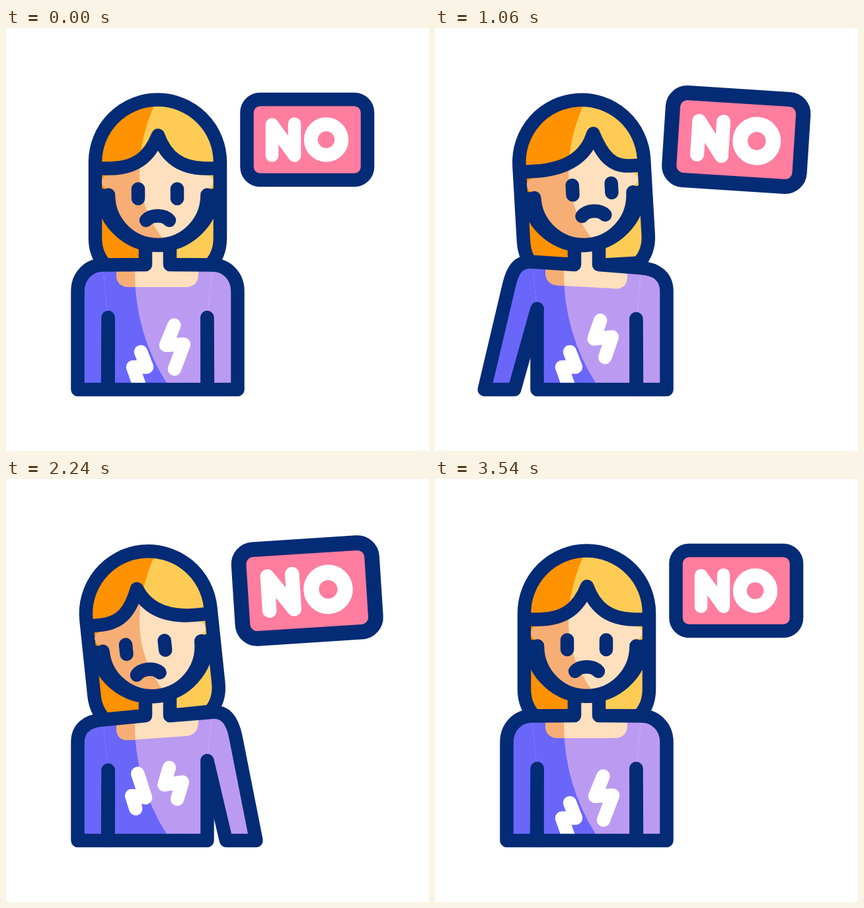
An HTML page with a canvas for the animation above (3600 ms loop, 640 px wide and 640 px high).

```html
<!DOCTYPE html>
<html lang="en">
<head>
<meta charset="utf-8">
<title>No</title>
<style>
html, body { margin: 0; width: 100%; height: 100%; overflow: hidden; background: #fff; }
canvas { display: block; width: 640px; height: 640px; }
</style>
</head>
<body>
<canvas id="stage" width="640" height="640" role="img" aria-label="Sad woman beside a sign that says NO"></canvas>
<script>
const ctx = document.getElementById('stage').getContext('2d');
const LOOP = 3600, PULSE = 812, MID = 229.5;
const NAVY = '#042b75', PINK = '#ff7d9f', WHITE = '#fff';
const HAIR = ['#fecc55', '#ff9200'];
const SKIN = ['#fee0be', '#f7ae75'];
const SHIRT = ['#bb9bf2', '#6a66fa'];

// Eased 0..1 between two times
function ramp(t, from, to) {
  const u = Math.min(1, Math.max(0, (t - from) / (to - from)));
  return u * u * (3 - 2 * u);
}

// Rest -> first lean -> second lean -> rebound -> rest
function pose(t, first, second, rebound = 0) {
  return first * ramp(t, 0, 480)
    + (second - first) * ramp(t, 1340, 2000)
    + (rebound - second) * ramp(t, 2620, 3080)
    - rebound * ramp(t, 3080, 3420);
}

// Four soft pulses, starting after a delay
function pulse(t, delay) {
  const u = (t - delay) / PULSE;
  return u > 0 && u < 4 ? Math.sin(Math.PI * u) ** 2 : 0;
}

// Swing that fades out over the loop
function wobble(t) {
  const size = 17.2 * (1 - t / 3500) * ramp(t, 0, 400) * (1 - ramp(t, 3150, 3300));
  return -size * Math.cos(2 * Math.PI * (t - 490) / 815);
}

const shadeHead = new Path2D('M80 80H240L232 100C213 138 202 180 202 215C202 255 215 291 242 325V370H80Z');
const shadeBody = new Path2D('M40 340H195V372A307 307 0 0 0 243 537L250 560H40Z');
const hair = new Path2D('M152 360Q135 344 135 318V203A94.5 94.5 0 0 1 324 203V318Q324 344 307 360Z');
const jaw = new Path2D('M155 252.5A74.75 75.5 0 0 0 304.5 252.5M145 253A85 85 0 0 0 314 253');
const features = new Path2D('M200 243.5V258M259 243.5V258M212 291C220 282 239 282 247 291');
const collar = new Path2D('M167 358V372Q167 392 187 392H271Q291 392 291 372V358Z');
const letterN = new Path2D('M402.5 193V146L436.5 193V145');
const letterO = new Path2D();
letterO.arc(484.5, 169, 23.2, 0, 7);
const frame = new Path2D();
frame.roundRect(364.5, 108, 182.5, 122, 20);

function stroke(path, color = NAVY, width = 20.5) {
  ctx.strokeStyle = color;
  ctx.lineWidth = width;
  ctx.stroke(path);
}

function fill(path, color) {
  ctx.fillStyle = color;
  ctx.fill(path);
}

function inside(place, draw) {
  ctx.save();
  place();
  draw();
  ctx.restore();
}

// Light tone everywhere, dark tone left of the fixed shade edge
function twoTone(path, [light, dark], shade, place = () => {}) {
  inside(place, () => fill(path, light));
  inside(() => { ctx.clip(shade); place(); }, () => fill(path, dark));
}

function turn(deg, x, y, scale = 1) {
  ctx.translate(x, y);
  ctx.rotate(deg * Math.PI / 180);
  ctx.scale(scale, scale);
  ctx.translate(-x, -y);
}

// side: -1 left, 1 right; out: how far the hand swings away from the body
function armShape(side, out, tilt) {
  const raised = Math.max(out, 0), x = d => MID + side * d;
  const drop = side * tilt * 83;
  const sy = 358.5 + drop, py = 398 - 0.25 * raised;
  const px = 121 - 0.1 * raised, hand = 121 + out;
  const lean = (hand - px) / (547 - py) * 22;
  const pit = [x(75), 438 + drop * 0.45 - 0.33 * raised];
  const limb = `L${x(83)} ${sy}C${x(105)} ${sy + side * tilt * 22} ${x(px - lean)} ${py - 22} ${x(px)} ${py}`
    + `L${x(hand)} 547H${x(hand - 45.5)}L${pit}`;
  return {
    pit, x, sy,
    line: new Path2D(`M${x(18.5)} 322V358${limb}`),
    area: new Path2D(`M${pit}${limb}Z`)
  };
}

// Zigzag between its resting and raised corner points
function bolt(rest, raised, u) {
  const at = i => rest[i] + (raised[i] - rest[i]) * u;
  const path = new Path2D();
  for (let i = 0; i < rest.length; i += 2) path.lineTo(at(i), at(i + 1));
  stroke(path, WHITE);
}

function drawBody(t) {
  const tilt = pose(t, 0.056, -0.07);
  const drift = 0.75 + 0.25 * ramp(t, 480, 1340);
  const l = armShape(-1, pose(t, 36 * drift, 0, -7), tilt);
  const r = armShape(1, pose(t, 0, 28, -7), tilt);
  const sides = `M${l.pit}V547H${r.x(75)}V${r.pit[1]}`;
  const torso = new Path2D(`${sides}L${r.x(83)} ${r.sy}L248 358H211L${l.x(83)} ${l.sy}Z`);

  twoTone(torso, SHIRT, shadeBody);
  bolt([204, 490, 213, 513, 192, 513, 203, 544], [199, 444, 211, 481, 190, 478, 196, 497], pulse(t, 260));
  bolt([254.5, 449.5, 242, 480, 269, 478.5, 255, 516], [247, 437, 239.5, 463, 267, 459, 259, 485], 1.4 * pulse(t, 70));
  stroke(new Path2D(sides));
  fill(l.area, SHIRT[1]);
  fill(r.area, SHIRT[0]);
  twoTone(collar, SKIN, shadeBody, () => ctx.transform(1, tilt, 0, 1, 0, -tilt * MID));
  ctx.fillStyle = SKIN[0];
  ctx.fillRect(211, 318, 37, 54);
  for (const arm of [l, r]) stroke(arm.line);
}

function drawHead(t, place) {
  const gaze = pose(t, 13.5, -9.6), tip = 1.45 * gaze, half = tip * 0.55;
  const curve = `H158C${195 + half} 212 ${217 + tip} 196 ${230 + tip} ${162.5 - 0.1 * tip}`
    + `C${242.5 + tip} 196 ${264.5 + half} 212 301.5 212.5`;
  const fringe = new Path2D(`M138 212.5${curve}H321`);
  const face = new Path2D(`M155 212.5${curve}V223A10 10 0 0 1 304.5 243V252.5A74.75 75.5 0 0 1 155 252.5V243A10 10 0 0 1 155 223Z`);

  twoTone(face, SKIN, shadeHead, place);
  inside(place, () => {
    stroke(jaw);
    stroke(fringe);
    ctx.translate(gaze, pose(t, -6.5, 2.5));
    stroke(features);
  });
}

function drawSign(t) {
  inside(() => turn(wobble(t), 455.75, 169, 1 + 0.165 * pulse(t, 45)), () => {
    fill(frame, PINK);
    stroke(frame);
    stroke(letterN, WHITE, 19.5);
    stroke(letterO, WHITE, 21);
  });
}

function draw(t) {
  const place = () => turn(pose(t, -3.3, -6, 3), MID, 338);
  ctx.fillStyle = WHITE;
  ctx.fillRect(0, 0, 640, 640);
  ctx.lineCap = ctx.lineJoin = 'round';
  twoTone(hair, HAIR, shadeHead, place);
  inside(place, () => stroke(hair));
  drawBody(t);
  drawHead(t, place);
  drawSign(t);
}

const start = performance.now();
function tick() {
  draw((performance.now() - start) % LOOP);
  requestAnimationFrame(tick);
}
tick();
</script>
</body>
</html>
```
